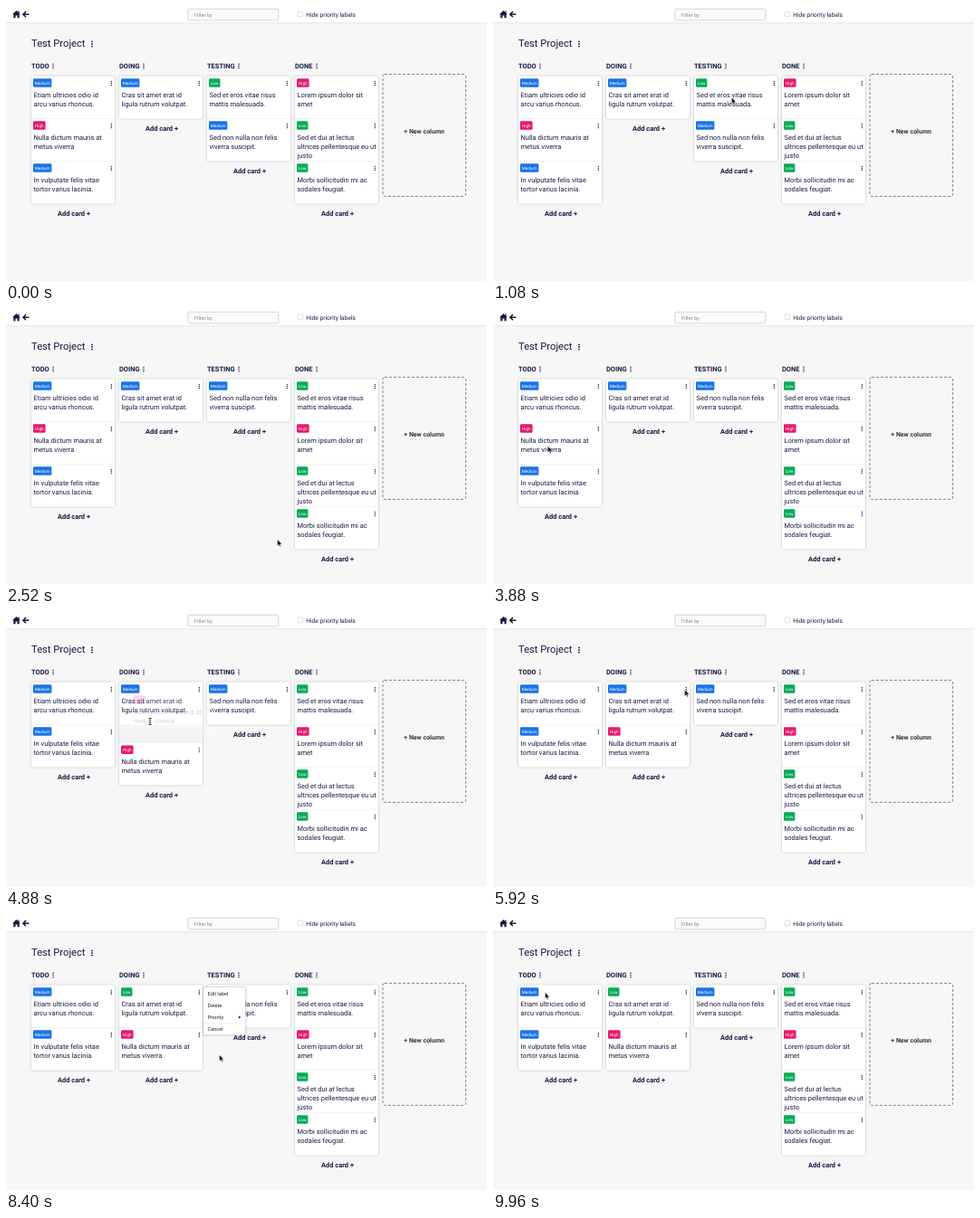
These frames come from a looping animation (531 by 304 pixels, 10000 ms). An HTML page:

```html
<!DOCTYPE html>
<html lang="en">
<head>
<meta charset="utf-8">
<title>Board</title>
<style>
html, body { margin: 0; width: 100%; height: 100%; overflow: hidden; background: #f7f7f7; }
svg { display: block; width: 531px; height: 304px; }
text { font: 7.47px Roboto, sans-serif; fill: #191945; text-rendering: geometricPrecision; white-space: pre; }
.title { font-size: 11.2px; }
.bold { font-weight: 700; }
.mid { text-anchor: middle; }
.tag { font-size: 4.67px; fill: #fff; }
.small { font-size: 5.6px; fill: #222; }
.lit { fill: #fff; }
.panel { fill: #f4f4f4; filter: drop-shadow(0 .7px 1px rgba(0,0,0,.28)); }
.menu { fill: #fff; filter: drop-shadow(0 .7px 1.2px rgba(0,0,0,.4)); }
</style>
</head>
<body>
<svg viewBox="0 0 531 304">
  <rect width="531" height="304" fill="#f7f7f7"/>
  <rect width="531" height="18.5" fill="#fff"/>
  <path d="M0 18.7H531" stroke="#dedede" stroke-width=".7"/>
  <path d="M11.5 5 7 9.2H8.3V13.2H10.5V10.4H12.5V13.2H14.7V9.2H16L14.6 7.9V5.6H13.5V6.9Z" fill="#191945"/>
  <path d="M25.5 9.2H19M22 6.1 18.9 9.2 22 12.3" fill="none" stroke="#191945" stroke-width="1.5"/>
  <rect x="200.9" y="3.3" width="100" height="12.6" rx="1.5" fill="#fafafa" stroke="#c4c4c4" stroke-width=".7"/>
  <text class="small" x="208" y="11.6" style="fill:#8a8a8a">Filter by</text>
  <rect x="322.1" y="6.1" width="5.6" height="5.6" rx=".8" fill="#fff" stroke="#ccc" stroke-width=".6"/>
  <text x="331.3" y="12.3" style="font-size:6.6px">Hide priority labels</text>
  <text class="title" x="28" y="45.2">Test Project</text>
  <rect x="416" y="75.4" width="91.6" height="135" rx="2" fill="none" stroke="#777" stroke-width=".9" stroke-dasharray="3 2"/>
  <text class="bold mid" x="461.6" y="140.7" style="font-size:7px;fill:#333">+ New column</text>
  <g id="scene"></g>
</svg>
<script>
const LOOP = 10000, ROW = 47, TOP = 77.5, WIDTH = 92, GAP = 23.4;
const DROP1 = 1620, DROP2 = 4810, MENU = 6250, SUBMENU = 6600, PICK = 7450, CLOSE = 8460;
const TAGS = { Low: [12.4, '#06ab56'], Medium: [20.4, '#1a73e8'], High: [13.6, '#e6196e'] };
const COLUMNS = [['TODO', 52], ['DOING', 152], ['TESTING', 257], ['DONE', 343]];
const scene = document.getElementById('scene');

const card = (tag, ...lines) => ({ tag, lines });
const etiam = card('Medium', 'Etiam ultricies odio id', 'arcu varius rhoncus.');
const nulla = card('High', 'Nulla dictum mauris at', 'metus viverra');
const vulputate = card('Medium', 'In vulputate felis vitae', 'tortor varius lacinia.');
const cras = card('Medium', 'Cras sit amet erat id', 'ligula rutrum volutpat.');
const eros = card('Low', 'Sed et eros vitae risus', 'mattis malesuada.');
const non = card('Medium', 'Sed non nulla non felis', 'viverra suscipit.');
const lorem = card('High', 'Lorem ipsum dolor sit', 'amet');
const lectus = card('Low', 'Sed et dui at lectus', 'ultrices pellentesque eu ut', 'justo');
const morbi = card('Low', 'Morbi sollicitudin mi ac', 'sodales feugiat.');

// Pointer stops: time, x, y
const PATH = [
  [200, 534, 172], [900, 263.4, 101], [1080, 263.4, 101], [1560, 347.5, 91], [1720, 347.5, 91],
  [2500, 300, 255], [3100, 190, 200], [3680, 40, 165], [3860, 60.5, 151.5], [3960, 60.5, 151.5],
  [4180, 48.5, 155.7], [4260, 48.5, 155.7], [4780, 159, 121], [5150, 159, 121], [6000, 213, 85],
  [6300, 213, 85], [6720, 239, 112], [6900, 239, 112], [7200, 272, 113], [7550, 272, 113],
  [8300, 235.5, 154.5], [8560, 235.5, 154.5], [9250, 48, 88], [9650, 57.5, 85.5]
];
const GRAB1 = PATH[2], GRAB2 = PATH[11];

const smooth = (t, from, to) => {
  const u = Math.min(1, Math.max(0, (t - from) / (to - from)));
  return u * u * (3 - 2 * u);
};

function pointerAt(t) {
  const next = PATH.findIndex(stop => stop[0] > t);
  if (next === 0) return [-20, -20];
  if (next < 0) return PATH.at(-1).slice(1);
  const a = PATH[next - 1], b = PATH[next], u = smooth(t, a[0], b[0]);
  return [a[1] + (b[1] - a[1]) * u, a[2] + (b[2] - a[2]) * u];
}

const text = (x, y, string, cls = '') => `<text x="${x}" y="${y}" class="${cls}">${string}</text>`;
const rect = (x, y, w, h, attrs) => `<rect x="${x}" y="${y}" width="${w}" height="${h}" ${attrs}/>`;
const dots = (x, y, step = 2.3, r = .75) =>
  [-step, 0, step].map(d => `<circle cx="${x}" cy="${y + d}" r="${r}" fill="#191945"/>`).join('');

function drawCard({ tag, lines }, x, y) {
  const [w, color] = TAGS[tag];
  return rect(x, y, WIDTH, ROW, 'rx="2" fill="#fff"') +
    rect(x + 2, y + 2.8, w, 9.5, `rx="1.4" fill="${color}"`) +
    text(x + 2 + w / 2, y + 9.2, tag, 'tag mid') + dots(x + 88.3, y + 8, 2, .65) +
    lines.map((line, i) => text(x + 2.5, y + 23.2 + i * 10.1, line)).join('');
}

function drawColumn(index, cards, gapAt, gap) {
  const x = 28 + index * 97, [name, dotsX] = COLUMNS[index];
  const height = cards.length * ROW + gap;
  let out = text(x, 69.2, name, 'bold') + dots(dotsX, 66.5) +
    rect(x, TOP, WIDTH, height, 'rx="2" class="panel"');
  cards.forEach((item, i) => {
    const y = TOP + i * ROW + (i >= gapAt ? gap : 0);
    if (item) out += drawCard(item, x, y);
    if (i) out += rect(x, y - .3, WIDTH, .6, 'fill="#eee"');
  });
  return out + text(x + 47, TOP + height + 13.6, 'Add card +', 'bold mid');
}

function drawBoard(t) {
  const gap1 = GAP * (t < DROP1 ? smooth(t, 1300, 1500) : 1 - smooth(t, DROP1, DROP1 + 300));
  const gap2 = GAP * (t < DROP2 ? smooth(t, 4500, 4700) : 1 - smooth(t, DROP2, DROP2 + 300));
  const moved1 = t >= DROP1, moved2 = t >= DROP2;
  const first = t < PICK ? cras : { ...cras, tag: 'Low' };
  return dots(95, 42, 2.6, .9) +
    drawColumn(0, moved2 ? [etiam, vulputate] : [etiam, nulla, vulputate], 9, 0) +
    drawColumn(1, moved2 ? [first, nulla] : [first], 1, gap2) +
    drawColumn(2, moved1 ? [t < DROP1 + 60 ? null : non] : [eros, non], 9, 0) +
    drawColumn(3, moved1 ? [eros, lorem, lectus, morbi] : [lorem, lectus, morbi], 0, gap1);
}

function drawGhost(t, item, x, y, grab, drop, [px, py]) {
  const fade = 110;
  if (t < grab[0] || t > drop + fade) return '';
  const alpha = .5 * Math.min(1, 1 - (t - drop) / fade);
  return `<g opacity="${alpha}">${drawCard(item, x + px - grab[1], y + py - grab[2])}</g>`;
}

function drawMenu(t, [px, py]) {
  if (t < MENU || t >= CLOSE) return '';
  const submenu = t >= SUBMENU && t < PICK;
  const inside = px > 218 && px < 264 && py > 80 && py < 132;
  const active = submenu ? 2 : inside ? Math.floor((py - 80) / 13) : -1;
  const highlight = (x, y) => rect(x, y, 46.4, 13, 'fill="#1c1c50"');
  let out = rect(218, 80, 46.4, 52.5, 'rx="1" class="menu"') + rect(218, 119.3, 46.4, .5, 'fill="#ddd"');
  if (active >= 0) out += highlight(218, 80 + active * 13);
  ['Edit label', 'Delete', 'Priority', 'Cancel'].forEach((label, i) => {
    out += text(222.5, 89 + i * 13, label, i === active ? 'small lit' : 'small');
  });
  out += `<path d="M256.8 111.4V114.6L259.4 113Z" fill="${active === 2 ? '#fff' : '#222'}"/>`;
  if (!submenu) return out;
  const over = px > 264 ? Math.floor((py - 106) / 13) : -1;
  out += rect(264.4, 106, 46, 39.2, 'rx="1" class="menu"');
  if (over >= 0) out += highlight(264.4, 106 + over * 13);
  ['Low', 'Medium', 'High'].forEach((label, i) => {
    out += text(i === 1 ? 277 : 268.8, 115 + i * 13, label, i === over ? 'small lit' : 'small');
  });
  return out + '<path d="M268.6 126.2 270 127.8 272.6 123.8" fill="none" stroke="#222" stroke-width=".8"/>';
}

function drawPointer(t, [x, y]) {
  const beam = t > DROP2 && t < 5250, hand = t > 5950 && t < 7700;
  const shape = beam ? '<path d="M-1.5-3.5H1.5M0-3.5V3.5M-1.5 3.5H1.5" stroke="#111" stroke-width=".8"/>'
    : hand ? '<path d="M-.8 0Q0-.8.8 0V2.8L4 3.6Q4.6 4 4.2 5.8L3.5 8H-.3L-2.4 4.8Q-2 4-.8 4.8Z" fill="#111" stroke="#fff" stroke-width=".5"/>'
    : '<path d="M0 0V7L1.6 5.6 2.6 8 3.8 7.5 2.8 5.2H5Z" fill="#111" stroke="#fff" stroke-width=".4"/>';
  return `<g transform="translate(${x} ${y})">${shape}</g>`;
}

function draw(now) {
  const t = now % LOOP, pointer = pointerAt(t);
  scene.innerHTML = drawBoard(t) +
    drawGhost(t, eros, 222, TOP, GRAB1, DROP1, pointer) +
    drawGhost(t, nulla, 28, TOP + ROW, GRAB2, DROP2, pointer) +
    drawMenu(t, pointer) + drawPointer(t, pointer);
  requestAnimationFrame(draw);
}
requestAnimationFrame(draw);
</script>
</body>
</html>
```
